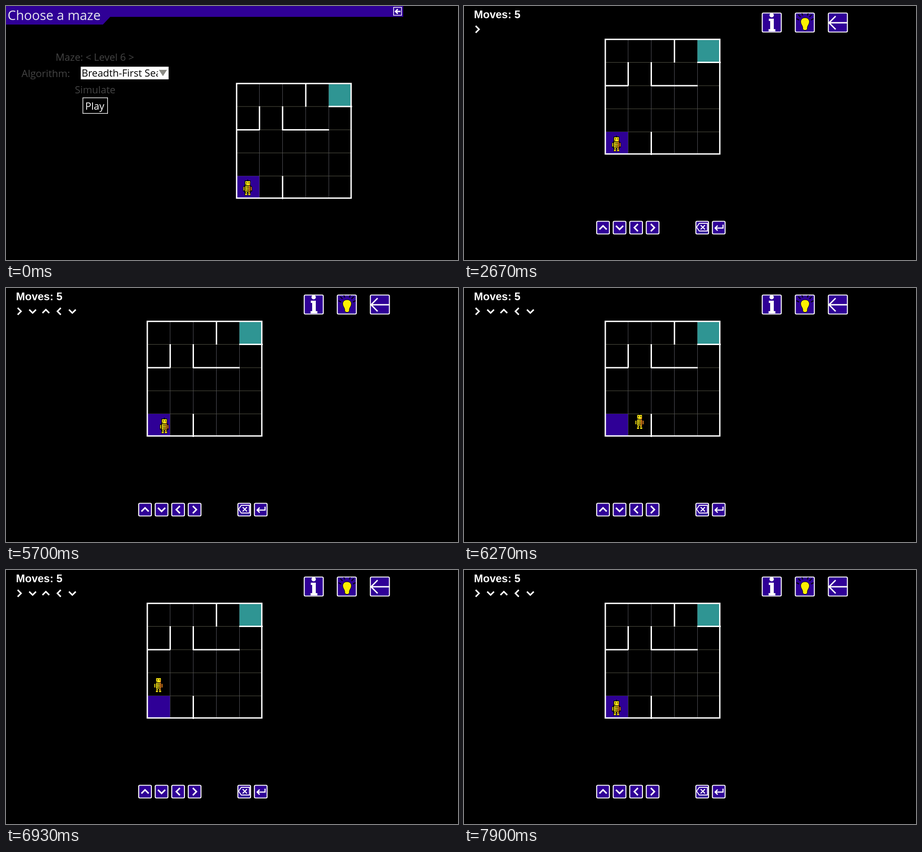
An HTML page for the animation above (8000 ms loop, 998 by 561 pixels).

```html
<!DOCTYPE html>
<html lang="en">
<head>
<meta charset="utf-8">
<title>Maze</title>
<style>
  html, body { margin: 0; width: 100%; height: 100%; overflow: hidden; background: #000; }
  svg { display: block; width: 998px; height: 561px; }
  .ui { font-family: "Open Sans", "Noto Sans", sans-serif; font-size: 22px; }
  .dim { fill: #444; }
  .moves { font: bold 24px "Liberation Sans", Arial, sans-serif; fill: #fff; }
  .line { fill: none; stroke: #fff; }
  .btn { fill: #2f0096; stroke: #fff; }
</style>
</head>
<body>
<svg id="stage" viewBox="0 0 998 561" xmlns="http://www.w3.org/2000/svg">
  <defs>
    <g id="grid">
      <path d="M362.300 75V326M413.400 75V326M464.500 75V326M515.600 75V326" stroke="#54545c" fill="none"/>
      <path d="M313 124.500H564M313 176H564M313 227H564M313 278H564" stroke="#545446" fill="none"/>
      <rect x="515.5" y="75" width="49" height="49" fill="#2f9593"/>
      <rect x="313" y="278" width="49" height="48" fill="#2f0096"/>
      <rect class="line" x="312" y="73.700" width="252.800" height="253.100" stroke-width="3"/>
      <path class="line" stroke-width="3" d="M464.700 74V125M362.500 124V176M413.500 124V177M312 176H363M413 176H516M515 124.500H567M413.500 278V329"/>
    </g>
    <!-- centred on the middle of the sprite -->
    <g id="robot">
      <path fill="#000" d="M-1-18H1.500V-16H6.500V-5H8V-3H10V8H7V11H6.500V17H1V12H-.500V17H-6.500V11H-7V8H-10V-3H-8V-5H-6.500V-16H-1Z"/>
      <path fill="#fde814" d="M-5-14.500H5.500V-5.500H-5ZM-5-4H5.500V8.500H-5ZM-9-2H-7V6H-9ZM-4.500 9.500H-1V12H-4.500ZM1.500 9.500H5V12H1.500ZM-5.500 13H-1V16H-5.500ZM1.500 13H6V16H1.500Z"/>
      <path fill="#f58a1c" d="M3.500-9H5.500V-5.500H3.500ZM2.500-4H5.500V8.500H2.500ZM7-2H9V6H7ZM3.500 9.500H5V12H3.500Z"/>
      <path fill="#000" d="M-3-12H-1V-10H-3ZM2-12H4V-10H2ZM-2-7.500H3-6.500V-6.500H-2ZM-3-2H4V-.500H-3ZM-3 2H4V3.500H-3ZM-3 5.500H4V7H-3Z"/>
    </g>
  </defs>

  <g id="menu">
    <path fill="#2f0096" d="M0 0H877V24H230L214 41H0Z"/>
    <text class="ui" x="3.600" y="31" style="font-size:29px" fill="#e6e6ee">Choose a maze</text>
    <rect class="btn" x="855.800" y="3" width="17.500" height="17.500" stroke-width="1.500"/>
    <path class="line" stroke-width="3" d="M871 12H860M865 7L860 12L865 17"/>
    <text class="ui dim" x="109.500" y="121">Maze: &lt; Level 6 &gt;</text>
    <text class="ui dim" x="34.300" y="157">Algorithm:</text>
    <text class="ui dim" x="152" y="193">Simulate</text>
    <rect x="165" y="134" width="194" height="28" fill="#fff"/>
    <svg x="165" y="134" width="170.500" height="28" style="width:170.5px;height:28px"><text class="ui" x="2" y="22" fill="#000">Breadth-First Search</text></svg>
    <path d="M337.500 141H355.500L346.500 155Z" fill="#8a8a84"/>
    <rect class="line" x="169.700" y="202.700" width="54.600" height="34.600" stroke-width="1.400"/>
    <text class="ui" x="175" y="229" fill="#fff">Play</text>
    <use href="#grid" x="197.200" y="97.500"/>
    <use href="#robot" x="533.500" y="401.500"/>
  </g>

  <g id="game" visibility="hidden">
    <text class="moves" x="22" y="27">Moves: 5</text>
    <g id="typed"></g>
    <g id="buttons"></g>
    <g fill="#fff">
      <circle cx="679.300" cy="20.300" r="4.800"/>
      <path d="M673 28H684V51H687.500V56H672.500V51H676V33H673Z"/>
    </g>
    <path d="M734 28L740 31M738 19L743 24M746 16L748 21M760 16L758 21M768 19L763 24M772 28L766 31" stroke="#000" stroke-width="2" fill="none"/>
    <path d="M753 26C759.500 26 762.500 30.500 762.500 35C762.500 40 758.500 43 758 47.500V51L755 53.500H751L748 51V47.500C747.500 43 743.500 40 743.500 35C743.500 30.500 746.500 26 753 26Z" fill="#fdf000" stroke="#000" stroke-width="1"/>
    <path class="line" stroke-width="3" d="M846 37H806M820.500 22.500L806 37L820.500 51.500"/>
    <path class="line" stroke-width="2" d="M513.500 488.500L519.500 480H537.500V497H519.500Z"/>
    <path class="line" stroke-width="2.400" d="M522.500 484L532 493.500M532 484L522.500 493.500"/>
    <path class="line" stroke-width="2.600" d="M572 483V490.500H555M560 485L554.500 490.500L560 496"/>
    <use href="#grid"/>
    <use id="player" href="#robot"/>
  </g>
</svg>
<script>
const $ = id => document.getElementById(id);
const LOOP = 8000, START = 1430, CELL = 51, BUMP = 14;
const HOME = [336.5, 304.5];
const TURN = { up: 0, right: 90, down: 180, left: 270 };

const chevron = (dir, x, y, w, h, width) =>
  `<path class="line" stroke-width="${width}" d="M${-w} ${h / 2}L0 ${-h / 2}L${w} ${h / 2}" ` +
  `transform="translate(${x} ${y}) rotate(${TURN[dir]})"/>`;

const button = (x, y, size) =>
  `<rect class="btn" x="${x}" y="${y}" width="${size}" height="${size}" rx="2.5" stroke-width="2.2"/>`;

$('buttons').innerHTML =
  [658.5, 731.5, 804.5].map(x => button(x, 15.5, 42)).join('') +
  [293, 329.5, 366, 402.5, 512, 548.5].map(x => button(x, 475.5, 28)).join('') +
  ['up', 'down', 'left', 'right'].map((d, i) =>
    chevron(d, 307 + 36.5 * i, 489.5, 8, 8, 3.2)).join('');

// key presses: time, direction
const keys = [[2640, 'right'], [2980, 'down'], [3270, 'up'], [3530, 'left'], [4000, 'down']];
$('typed').innerHTML = keys.map(([, d], i) =>
  chevron(d, 29.5 + 29.25 * i, 51.5, 7.5, 7.5, 3.2)).join('');
const marks = [...$('typed').children];

// robot legs: start, end, dx, dy, there and back
const legs = [
  [5570, 5960, CELL, 0],
  [5960, 6160, 0, BUMP, true],
  [6160, 6550, 0, -CELL],
  [6550, 6930, -CELL, 0],
  [6950, 7340, 0, CELL]
];
const ease = p => (1 - Math.cos(Math.PI * p)) / 2;

function place(t) {
  let [x, y] = HOME;
  for (const [from, to, dx, dy, back] of legs) {
    const p = Math.min(1, Math.max(0, (t - from) / (to - from)));
    const k = back ? Math.sin(Math.PI * p) : ease(p);
    x += dx * k;
    y += dy * k;
  }
  return [x, y];
}

const show = (el, on) => el.setAttribute('visibility', on ? 'inherit' : 'hidden');

function draw(now) {
  const t = now % LOOP;
  show($('menu'), t < START);
  show($('game'), t >= START);
  marks.forEach((m, i) => show(m, t >= keys[i][0]));
  const [x, y] = place(t);
  $('player').setAttribute('x', x.toFixed(2));
  $('player').setAttribute('y', y.toFixed(2));
}

const origin = performance.now();
function tick() {
  draw(performance.now() - origin);
  requestAnimationFrame(tick);
}
tick();
</script>
</body>
</html>
```
